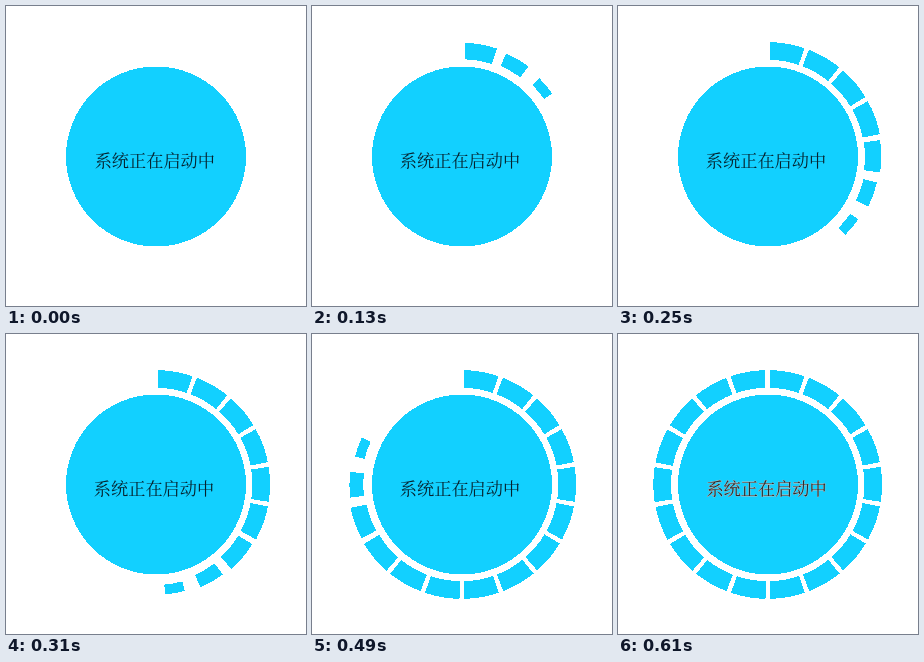
An HTML page for the animation above (0.64 s loop, 300 by 300 pixels).

```html
<!DOCTYPE html>
<html lang="zh-CN">
<head>
<meta charset="utf-8">
<style>
  html, body { margin: 0; width: 100%; height: 100%; overflow: hidden; background: #fff; }
  svg { display: block; width: 300px; height: 300px; }
  circle, path { fill: #12d0ff; shape-rendering: crispEdges; }
  text {
    font: 300 17.2px "Noto Serif CJK SC", "Noto Sans CJK SC", "Noto Sans CJK", serif;
    text-anchor: middle;
    fill: #06222e;
  }
  .faded { fill: #2c2c2c; stroke: #b4bcc0; stroke-width: .8px; paint-order: stroke; }
</style>
</head>
<body>
<svg viewBox="0 0 300 300">
  <circle cx="150" cy="150.5" r="90"/>
  <g id="ring"></g>
  <g id="label"></g>
</svg>
<script>
const LOOP = 640, FIRST = 70, STEP = 30, LAST = 610;
const COUNT = 18, CX = 149.7, CY = 150.5;

// Growth stages of a segment: inner radius, outer radius, half angle
const STAGES = [
  [100.5, 110.3, 5.2],
  [98.5, 112.3, 6.6],
  [97.2, 113.6, 8.2],
  [96.7, 114.4, 8.8]
];

const ring = document.getElementById('ring');
const label = document.getElementById('label');

function add(parent, tag, attrs) {
  const el = document.createElementNS('http://www.w3.org/2000/svg', tag);
  for (const key in attrs) el.setAttribute(key, attrs[key]);
  return parent.appendChild(el);
}

function point(r, deg) {
  const a = deg * Math.PI / 180;
  return (CX + r * Math.sin(a)).toFixed(2) + ' ' + (CY - r * Math.cos(a)).toFixed(2);
}

function sector([inner, outer, half], mid) {
  const a = mid - half, b = mid + half;
  return `M${point(outer, a)}A${outer} ${outer} 0 0 1 ${point(outer, b)}` +
         `L${point(inner, b)}A${inner} ${inner} 0 0 0 ${point(inner, a)}Z`;
}

// Visible only from one time to another within each loop
function showBetween(el, from, to) {
  const frames = [{ offset: 0, opacity: from > 0 ? 0 : 1 }];
  if (from > 0) frames.push({ offset: from / LOOP, opacity: 1 });
  if (to < LOOP) frames.push({ offset: to / LOOP, opacity: 0 });
  frames.push({ offset: 1, opacity: to < LOOP ? 0 : 1 });
  for (const f of frames) f.easing = 'step-end';
  el.animate(frames, { duration: LOOP, iterations: Infinity });
}

for (let k = 0; k < COUNT; k++) {
  const born = FIRST + STEP * k;
  STAGES.forEach((stage, s) => {
    const full = s === STAGES.length - 1;
    const from = Math.min(born + STEP * s, LAST);
    const to = full ? LOOP : Math.min(from + STEP, LAST);
    if (from >= to) return;
    const path = add(ring, 'path', { d: sector(stage, 20 * k + 9.9) });
    showBetween(path, from, to);
  });
}

[[0, FIRST, 148.8, ''], [FIRST, LAST, 148, ''], [LAST, LOOP, 148.6, 'faded']]
  .forEach(([from, to, x, name]) => {
    const text = add(label, 'text', { x, y: 161, class: name });
    text.textContent = '系统正在启动中';
    showBetween(text, from, to);
  });
</script>
</body>
</html>
```
